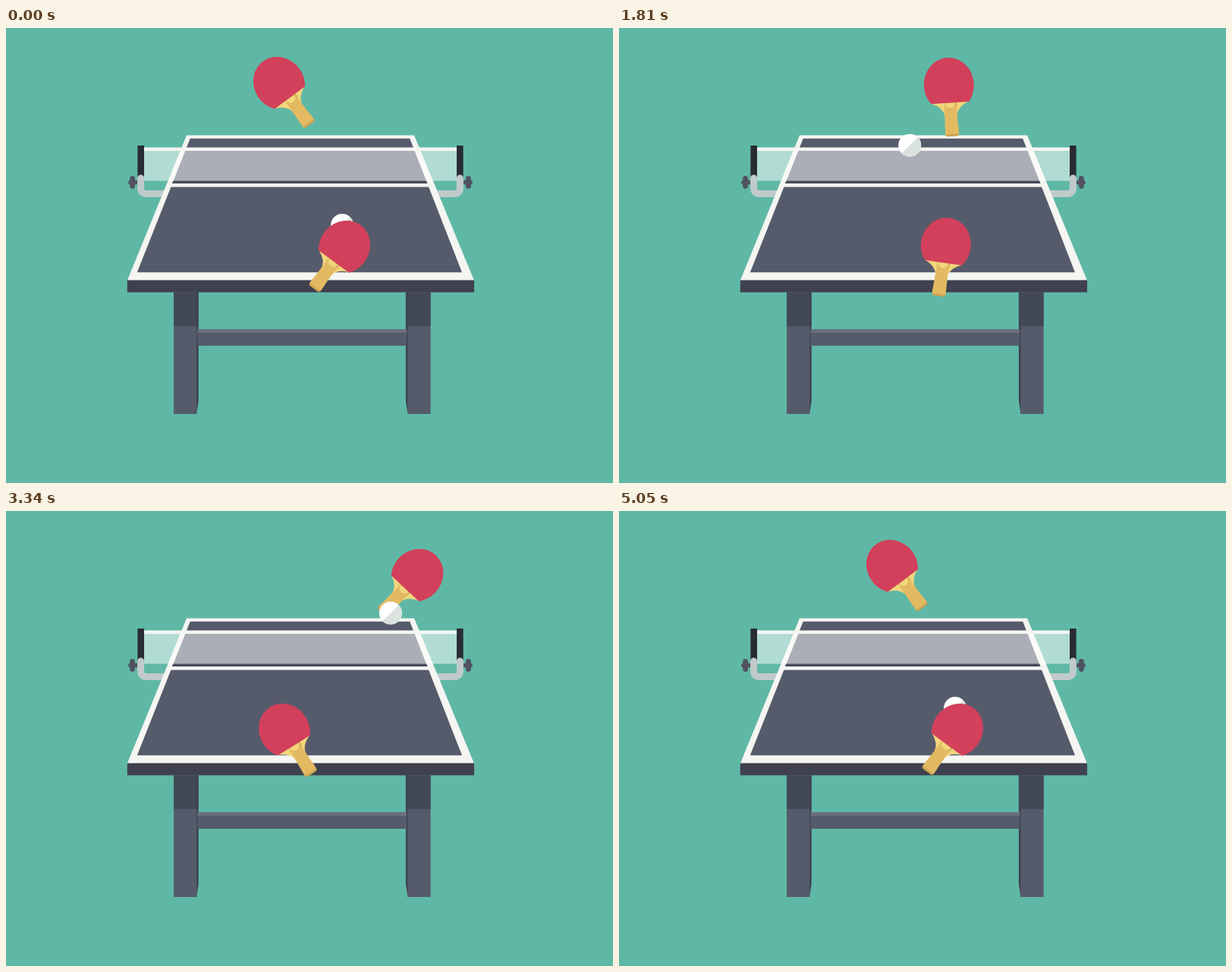
Write an HTML page with a canvas that moves like this. It is 800 px wide and 600 px high and loops after 5080 ms.

```html
<!DOCTYPE html>
<html lang="en">
<head>
<meta charset="utf-8">
<title>Table tennis</title>
<style>
html, body { margin: 0; width: 100%; height: 100%; overflow: hidden; background: #5fb8a5; }
canvas { display: block; width: 800px; height: 600px; }
</style>
</head>
<body>
<canvas id="stage" width="800" height="600"></canvas>
<script>
const ctx = document.getElementById('stage').getContext('2d');
const LOOP = 5080, SHOT = LOOP / 4, MOVE = 1240, LEAD = 5;
const WHITE = '#f5f5f2', SLATE = '#565b6c', DARK = '#3f414f';

// One pose per stroke; bats are [x, y, degrees], the ball is [x, y].
const ballKeys = [[443, 260], [354, 77], [425, 266], [539, 83]];
const farLeft = [367.1, 82.6, -36.5], farRight = [533.8, 93.4, 43];
const farKeys = [farLeft, farLeft, farRight, farRight];
const nearRight = [438.9, 298.6, 36.3];
const nearKeys = [nearRight, nearRight, [415, 297.1, -32], [356.9, 300.2, -32]];

const ease = u => u * u * (3 - 2 * u);

function pose(keys, shot, k) {
  const to = keys[(shot + 1) % 4];
  return keys[shot].map((v, i) => v + (to[i] - v) * k);
}

function rect(color, x0, y0, x1, y1) {
  ctx.fillStyle = color;
  ctx.fillRect(x0, y0, x1 - x0, y1 - y0);
}

function poly(color, ...pts) {
  ctx.fillStyle = color;
  ctx.beginPath();
  for (let i = 0; i < pts.length; i += 2) ctx.lineTo(pts[i], pts[i + 1]);
  ctx.fill();
}

function pill(color, x, y, w, h, r) {
  ctx.fillStyle = color;
  ctx.beginPath();
  ctx.roundRect(x, y, w, h, r);
  ctx.fill();
}

function mirrored(axis, draw) {
  draw();
  ctx.save();
  ctx.translate(axis * 2, 0);
  ctx.scale(-1, 1);
  draw();
  ctx.restore();
}

function leg() {
  poly('#3c414e', 250, 348.5, 253.7, 348.5, 253.7, 492, 251, 509, 250, 509);
  rect(SLATE, 221, 348.5, 251.3, 509);
  rect('#424854', 221, 348.5, 253.7, 393);
  rect('#393e4a', 251.3, 348.5, 252, 393);
}

function post() {
  rect('#292c33', 173.4, 155, 182, 198);
  pill('#50525f', 163.2, 195, 6.8, 17, 3.4);
  pill('#50525f', 161.3, 200.8, 13, 5.4, 2);
  ctx.strokeStyle = '#c0cacb';
  ctx.lineWidth = 9;
  ctx.lineCap = 'round';
  ctx.beginPath();
  ctx.moveTo(177.6, 198);
  ctx.lineTo(177.6, 211);
  ctx.quadraticCurveTo(177.6, 218.5, 185.5, 218.5);
  ctx.lineTo(209, 218.5);
  ctx.stroke();
}

function table() {
  mirrored(390.3, leg);
  rect(SLATE, 252.5, 397.5, 528, 419);
  rect('#6b6e7d', 252.5, 397.5, 528, 402);

  mirrored(388, post);
  poly(WHITE, 238, 141.5, 538, 141.5, 617, 333, 159.8, 333);
  poly(SLATE, 242.7, 145.8, 532.2, 145.8, 601, 322.3, 172.8, 322.3);
  rect(DARK, 159.8, 332.5, 617, 348.5);

  poly('#484b5b', 220.3, 201.5, 554, 201.5, 555.5, 205, 218.9, 205);
  rect(WHITE, 216, 205, 559, 209.6);

  rect('rgba(255,255,255,.51)', 182, 161, 594, 201.5);
  rect(WHITE, 182, 157.5, 594, 162);
}

function bat([x, y, deg]) {
  ctx.save();
  ctx.translate(x, y);
  ctx.rotate(deg * Math.PI / 180);
  ctx.translate(0, -12);

  // Flared neck
  ctx.fillStyle = '#f2d67b';
  ctx.beginPath();
  ctx.moveTo(-25, 23);
  ctx.quadraticCurveTo(-10, 29, -8, 40);
  ctx.lineTo(8, 40);
  ctx.quadraticCurveTo(10, 29, 25, 23);
  ctx.fill();

  // Handle
  pill('#cda552', -8.9, 55, 17.8, 13, 3);
  poly('#e3ba62', -7.8, 23, 7.8, 23, 8.9, 65, -8.9, 65);
  poly('#cda552', 7, 23, 9, 23, 8.6, 33);
  ctx.fillStyle = '#f2d67b';
  ctx.beginPath();
  ctx.arc(0, 24, 6.6, 0, Math.PI);
  ctx.fill();

  // Rubber, cut flat above the neck
  const cut = Math.asin(23.6 / 36);
  ctx.fillStyle = '#d2405b';
  ctx.beginPath();
  ctx.ellipse(0, 0, 33, 36, 0, Math.PI - cut, cut);
  ctx.fill();
  ctx.restore();
}

function ball([x, y]) {
  ctx.fillStyle = '#fff';
  ctx.beginPath();
  ctx.arc(x, y, 15, 0, Math.PI * 2);
  ctx.fill();
  ctx.fillStyle = '#dae3df';
  ctx.beginPath();
  ctx.arc(x, y, 15, -Math.PI / 4, Math.PI * 3 / 4);
  ctx.fill();
}

function draw(ms) {
  const t = (ms + LEAD) % LOOP;
  const shot = Math.floor(t / SHOT);
  const k = ease(Math.min(1, (t - shot * SHOT) / MOVE));
  rect('#5fb8a5', 0, 0, 800, 600);
  table();
  bat(pose(farKeys, shot, k));
  ball(pose(ballKeys, shot, k));
  bat(pose(nearKeys, shot, k));
}

const start = performance.now();
function tick() {
  draw(performance.now() - start);
  requestAnimationFrame(tick);
}
tick();
</script>
</body>
</html>
```
